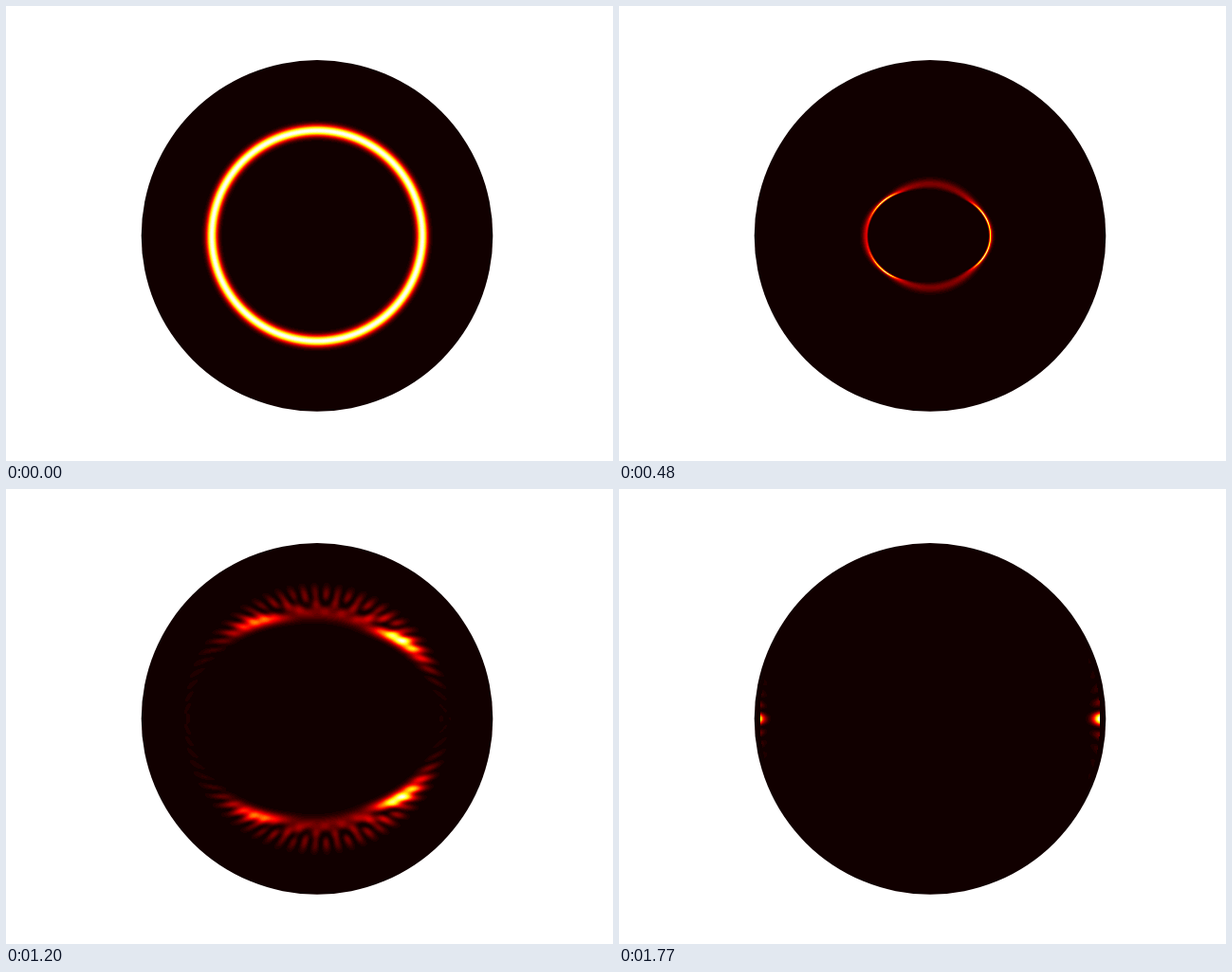
Write an HTML page with a canvas that moves like this. It is 640x480 px and loops after 1800 ms.

```html
<!DOCTYPE html>
<html lang="en">
<head>
<meta charset="utf-8">
<title>Ring wave packet</title>
<style>
html, body { margin: 0; width: 100%; height: 100%; overflow: hidden; background: #fff; }
canvas { display: block; }
</style>
</head>
<body>
<canvas id="stage" width="640" height="480"></canvas>
<script>
const ctx = document.getElementById('stage').getContext('2d');
const LOOP = 1800, STEP = 30;
const CX = 328, CY = 242.4, DISC = 185.3, EDGE = 179.5;
const SPEED = 0.118;        // px per ms
const START = 111;          // ring radius at time zero
const SOFT = 10;            // softness of the repelling wall
const BOUNCE_END = 615;     // ms, the packet has left the wall
const N = 240, L = 88;      // angles, Legendre terms
const KICK = 50;            // angular momentum scale given by the wall
const ROTOR = 0.00203 / (2 * KICK);
const LEVELS = 50;

const angles = Array.from({ length: N }, (_, i) => (i + 0.5) * Math.PI / N);
const shape = angles.map(a => {
  const c = Math.cos(a);
  return c * c - 0.32 * c + 0.23 * c ** 3;
});
const wall = shape.map(w => 41 + 17.5 * w);
const delay = shape.map(w => 83 + 22 * w);
const kickRe = shape.map((w, i) => Math.cos(KICK * w) * Math.sin(angles[i]));
const kickIm = shape.map((w, i) => -Math.sin(KICK * w) * Math.sin(angles[i]));

const legendre = new Float64Array(N * L);
angles.forEach((a, i) => {
  const x = Math.cos(a), o = i * L;
  legendre[o] = 1;
  legendre[o + 1] = x;
  for (let l = 1; l < L - 1; l++)
    legendre[o + l + 1] = ((2 * l + 1) * x * legendre[o + l] - l * legendre[o + l - 1]) / (l + 1);
});

const spread = t => 3.8 * Math.hypot(1, t / 1050);

// Contracting ring that turns around on the wall
function bounceField(t) {
  const step = 0.5, rows = Math.ceil(EDGE / step) + 2;
  const data = new Float32Array(rows * N), s = 3.9;
  const gauss = d => Math.exp(-d * d / (2 * s * s));
  for (let i = 0; i < N; i++) {
    const travelled = SPEED * t - START + wall[i];
    const turn = wall[i] + SOFT * Math.LN2;
    for (let k = 0; k < rows; k++) {
      const r = k * step;
      let x = 0, fade = 1;
      if (r < turn) fade = Math.exp(-(((turn - r) / 1.2) ** 2));
      else x = SOFT * Math.acosh(Math.max(1, Math.exp((r - wall[i]) / SOFT) / 2));
      if (fade < 0.001) continue;
      const slow = Math.sqrt(Math.tanh(x / SOFT) ** 2 + 0.1);
      data[k * N + i] = fade * (gauss(x - travelled) + gauss(x + travelled)) / slow;
    }
  }
  return { data, step, rows };
}

// Outgoing wave: angular kick from the wall, then free rotation
function outgoingField(t) {
  const rows = Math.ceil(EDGE) + 2, data = new Float32Array(rows * N), s = spread(t);
  const re = new Float64Array(L), im = new Float64Array(L);
  for (let r = 0; r < rows; r++) {
    re.fill(0);
    im.fill(0);
    let used = false;
    for (let i = 0; i < N; i++) {
      const d = r - (delay[i] - START + SPEED * t);
      if (Math.abs(d) > 4.5 * s) continue;
      used = true;
      const g = Math.exp(-d * d / (4 * s * s));
      const a = g * kickRe[i], b = g * kickIm[i], o = i * L;
      for (let l = 0; l < L; l++) {
        re[l] += a * legendre[o + l];
        im[l] += b * legendre[o + l];
      }
    }
    if (!used) continue;
    const age = Math.max(0, r - 38) / SPEED;
    for (let l = 0; l < L; l++) {
      const p = -ROTOR * l * (l + 1) * age, w = (2 * l + 1) * Math.PI / (2 * N);
      const c = Math.cos(p) * w, q = Math.sin(p) * w, a = re[l], b = im[l];
      re[l] = a * c - b * q;
      im[l] = a * q + b * c;
    }
    for (let i = 0; i < N; i++) {
      const o = i * L;
      let a = 0, b = 0;
      for (let l = 0; l < L; l++) {
        a += re[l] * legendre[o + l];
        b += im[l] * legendre[o + l];
      }
      data[r * N + i] = a * a + b * b;
    }
  }
  return { data, step: 1, rows };
}

// Black, red, yellow, white
const unit = v => Math.max(0, Math.min(1, v));
const palette = Array.from({ length: LEVELS }, (_, i) => {
  const v = (i + 0.5) / LEVELS;
  return [0.0416 + v / 0.381, (v - 0.365) / 0.381, (v - 0.746) / 0.254]
    .map(c => Math.round(255 * unit(c)));
});

const SIZE = 374, LEFT = 141, TOP = 55;
const layer = document.createElement('canvas');
layer.width = layer.height = SIZE;
const layerCtx = layer.getContext('2d');
const image = layerCtx.createImageData(SIZE, SIZE);
const radius = new Float32Array(SIZE * SIZE), column = new Float32Array(SIZE * SIZE);
for (let p = 0; p < SIZE * SIZE; p++) {
  const x = LEFT + p % SIZE + 0.5 - CX, y = TOP + Math.floor(p / SIZE) + 0.5 - CY;
  radius[p] = Math.hypot(x, y);
  column[p] = Math.max(0, Math.min(N - 1.001, Math.atan2(Math.abs(y), x) / Math.PI * N - 0.5));
}

function sample({ data, step }, r, col) {
  const row = Math.floor(r / step), i = Math.floor(col);
  const v = r / step - row, u = col - i, o = row * N + i;
  return (data[o] * (1 - u) + data[o + 1] * u) * (1 - v)
    + (data[o + N] * (1 - u) + data[o + N + 1] * u) * v;
}

function draw(t) {
  const field = t < BOUNCE_END ? bounceField(t) : outgoingField(t);
  let peak = 1e-12;
  const last = Math.floor(EDGE / field.step) * N;
  for (let i = 0; i < last; i++) peak = Math.max(peak, field.data[i]);
  for (let p = 0; p < SIZE * SIZE; p++) {
    const value = radius[p] < EDGE ? sample(field, radius[p], column[p]) / peak : 0;
    const color = palette[Math.min(LEVELS - 1, Math.floor(value * LEVELS))];
    image.data[4 * p] = color[0];
    image.data[4 * p + 1] = color[1];
    image.data[4 * p + 2] = color[2];
    image.data[4 * p + 3] = 255;
  }
  layerCtx.putImageData(image, 0, 0);
  ctx.fillStyle = '#fff';
  ctx.fillRect(0, 0, 640, 480);
  ctx.save();
  ctx.beginPath();
  ctx.arc(CX, CY, DISC, 0, 2 * Math.PI);
  ctx.clip();
  ctx.drawImage(layer, LEFT, TOP);
  ctx.restore();
}

let shown = -1;
function tick() {
  const index = Math.floor(performance.now() % LOOP / STEP);
  if (index !== shown) draw((shown = index) * STEP);
  requestAnimationFrame(tick);
}
tick();
</script>
</body>
</html>
```
